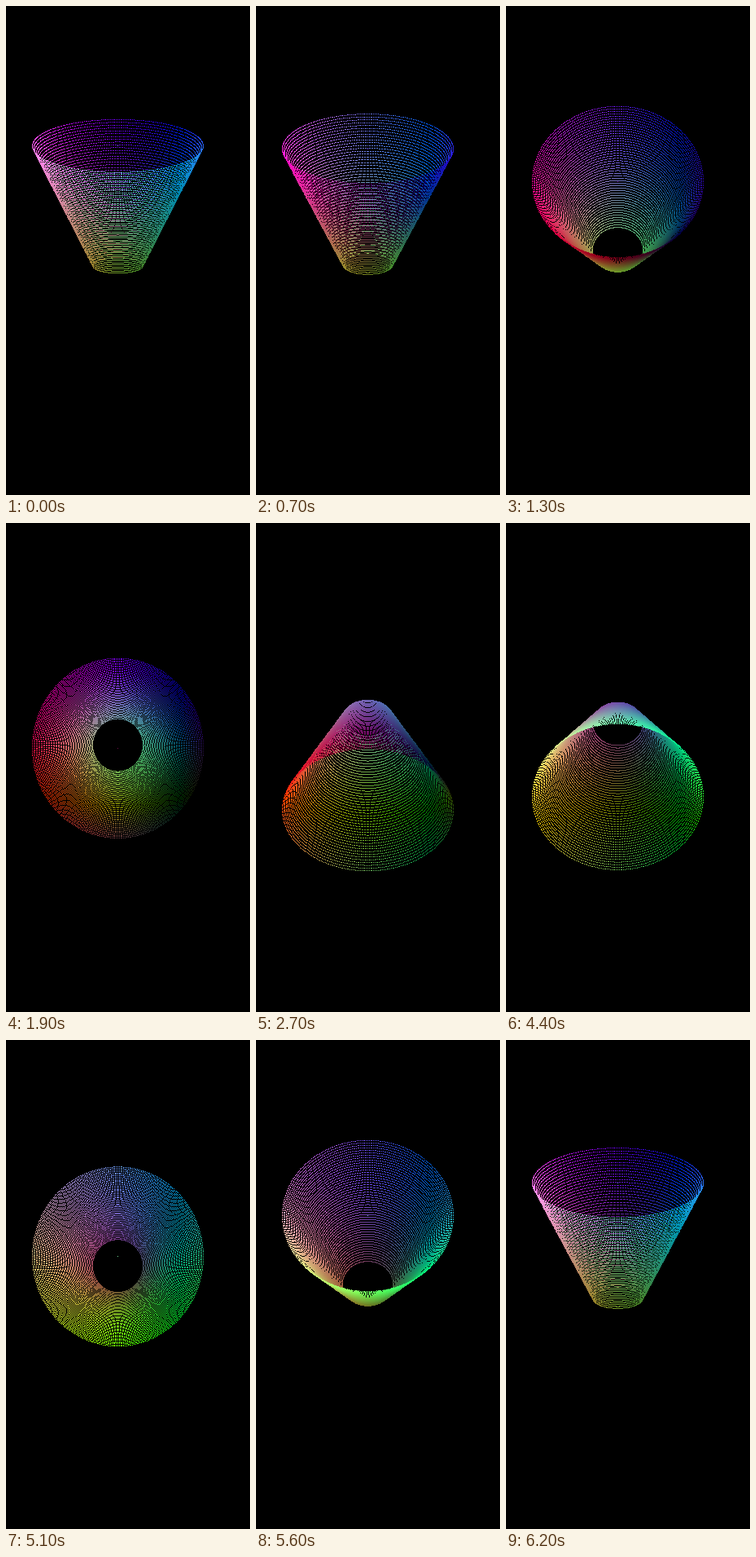
Recreate the animation shown at these times as an HTML page with a canvas. Size 300 by 600 pixels, loop 6300 ms.

```html
<!DOCTYPE html>
<html>
<head>
<meta charset="utf-8">
<style>
  html, body { margin: 0; width: 100%; height: 100%; overflow: hidden; background: #000; }
  canvas { display: block; }
</style>
</head>
<body>
<canvas id="stage" width="300" height="600"></canvas>
<script>
const ctx = document.getElementById('stage').getContext('2d');
const STEPS = 63, STEP_MS = 100;
const RINGS = 50, POINTS = 360;
const CENTER_X = 137, CENTER_Y = 273.2, ASPECT = 1.05;
const NARROW = { radius: 31, z: -46.6 }, WIDE = { radius: 105, z: 106.6 };
const mix = (a, b, k) => a + (b - a) * k;
const clamp = value => Math.max(0, Math.min(255, value));

function draw(step) {
  const image = ctx.createImageData(300, 600);
  const pixels = new Uint32Array(image.data.buffer).fill(0xff000000);
  const tilt = (step - 3) * 2 * Math.PI / STEPS;
  const sin = Math.sin(tilt), cos = Math.cos(tilt);

  // The colour follows the position of the rotated point.
  function plot(x, v, z) {
    const y = v * sin - z * cos;
    const depth = -z * sin - v * cos;
    const red = clamp(Math.abs(110 - 1.45 * x));
    const green = clamp(115 + 0.95 * depth + 0.4 * y);
    const blue = clamp(Math.abs(105 - 1.3 * y + 0.25 * depth));
    const index = Math.round(CENTER_Y + y) * 300 + Math.round(CENTER_X + x);
    pixels[index] = (255 << 24 | blue << 16 | green << 8 | red) >>> 0;
  }

  plot(0, 0, WIDE.z);
  for (let i = 0; i < RINGS; i++) {
    const k = i / (RINGS - 1);
    const radius = mix(NARROW.radius, WIDE.radius, k);
    const z = mix(NARROW.z, WIDE.z, k);
    for (let p = 0; p < POINTS; p++) {
      const angle = p * 2 * Math.PI / POINTS;
      plot(radius * Math.cos(angle), radius * ASPECT * Math.sin(angle), z);
    }
  }
  ctx.putImageData(image, 0, 0);
}

const start = performance.now();
let shown = -1;
function tick() {
  const step = Math.floor((performance.now() - start) / STEP_MS) % STEPS;
  if (step !== shown) draw(shown = step);
  requestAnimationFrame(tick);
}
tick();
</script>
</body>
</html>
```
